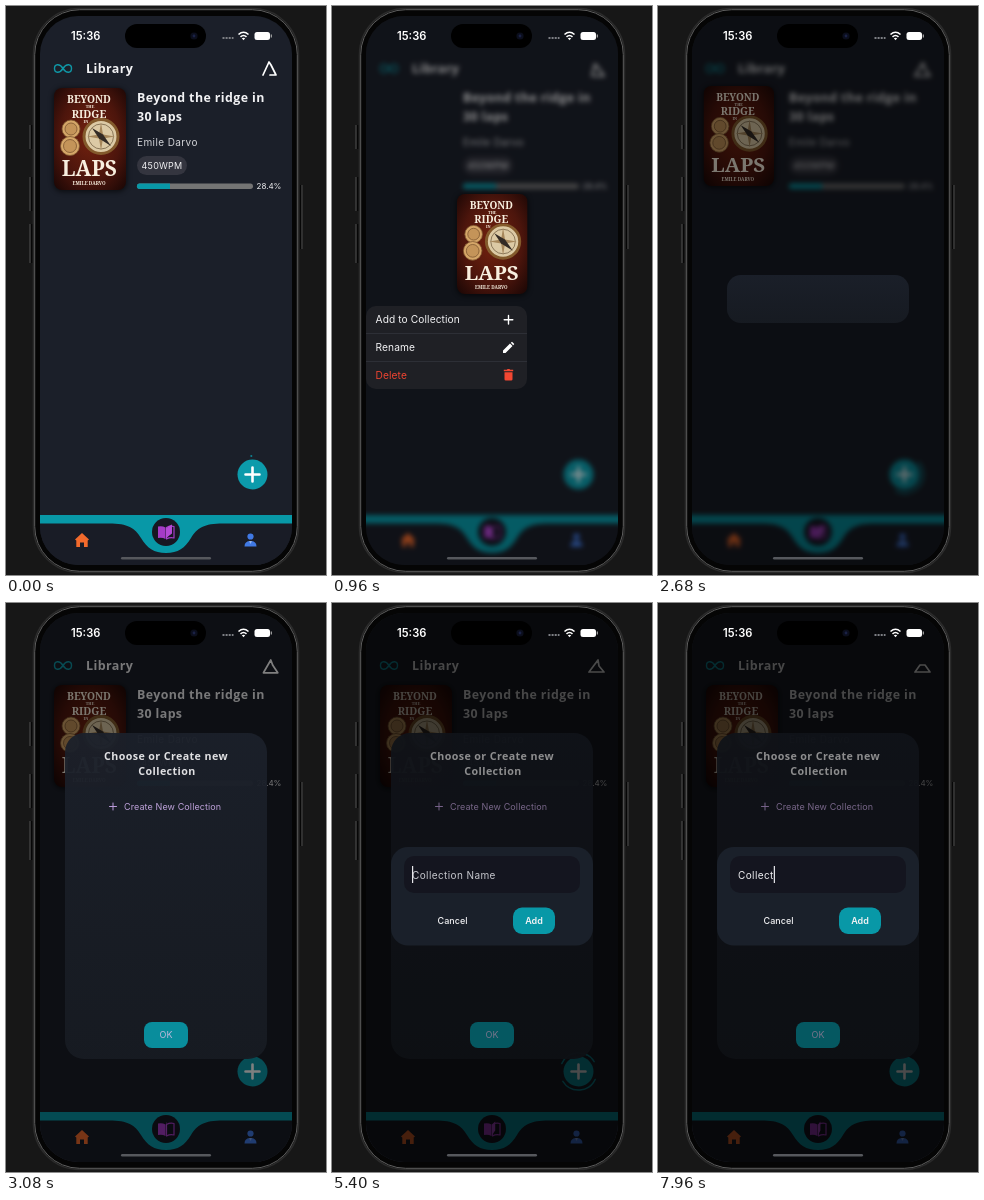
Recreate the animation shown at these times as an HTML page. Size 320x569 px, loop 8000 ms.

```html
<!DOCTYPE html>
<html lang="en">
<head>
<meta charset="utf-8">
<title>Library</title>
<style>
  html, body { margin: 0; width: 100%; height: 100%; overflow: hidden; background: #171717; }
  svg { display: block; width: 100vw; height: 100vh; }
  text { font-family: Inter, Roboto, sans-serif; fill: #f2f2f4; white-space: pre; }
  .head { font-family: "Open Sans", "Noto Sans", sans-serif; font-weight: 700; letter-spacing: .4px; }
  .cover text { font-family: "Noto Serif", serif; font-weight: 700; fill: #f8efdf; text-anchor: middle; }
  .mid { text-anchor: middle; }
  .line { fill: none; stroke: #fff; stroke-width: 1.4; stroke-linecap: round; stroke-linejoin: round; }
</style>
</head>
<body>
<svg viewBox="0 0 320 569">
  <defs>
    <clipPath id="screen"><rect x="34" y="10" width="252" height="549" rx="38"/></clipPath>
    <clipPath id="coverClip"><rect width="72" height="102" rx="8"/></clipPath>
    <filter id="soft" filterUnits="userSpaceOnUse" x="20" y="0" width="280" height="569" color-interpolation-filters="sRGB">
      <feGaussianBlur id="blur" stdDeviation="0"/>
    </filter>
    <filter id="shade" x="-20%" y="-20%" width="140%" height="140%"><feGaussianBlur stdDeviation="2.5"/></filter>
    <radialGradient id="leather" cx=".5" cy=".48" r=".7">
      <stop offset="0" stop-color="#74220f"/><stop offset=".6" stop-color="#4c150c"/><stop offset="1" stop-color="#1c0705"/>
    </radialGradient>
    <linearGradient id="panel" x2="0" y2="1">
      <stop offset="0" stop-color="#1b202a"/><stop offset="1" stop-color="#171b22"/>
    </linearGradient>
  </defs>

  <!-- phone body -->
  <rect width="320" height="569" fill="#171717"/>
  <path d="M25 119v24M25 171v34M25 218v39M295.500 179v64" stroke="#060606" stroke-width="3"/>
  <path d="M24 119v24M24 171v34M24 218v39M296 179v64" stroke="#666" stroke-width=".9"/>
  <rect x="27.500" y="2.500" width="265" height="564" rx="46" fill="#050505" stroke="#2b2b2b" stroke-width="1.600"/>
  <rect x="28.700" y="3.700" width="262.600" height="561.600" rx="45" fill="none" stroke="#5e5e5e" stroke-width="1"/>

  <g clip-path="url(#screen)">
    <g id="app">
      <rect x="20" width="280" height="569" fill="#1b1f29"/>
      <path d="M57 62.500C53.500 57 48.500 58 48.500 62.500S53.500 68 57 62.500 65.500 58 65.500 62.500 60.500 68 57 62.500Z" class="line" style="stroke:#0f96a5"/>
      <text class="head" x="80" y="67" font-size="12.500">Library</text>
      <path id="peak" class="line" style="stroke-width:1.700"/>
      <text class="head" x="131" y="96" font-size="12.400">Beyond the ridge in</text>
      <text class="head" x="131" y="115" font-size="12.400">30 laps</text>
      <text x="131" y="140" font-size="10" letter-spacing=".4" style="fill:#d3d4d8">Emile Darvo</text>
      <rect x="131" y="150" width="50" height="19" rx="9.500" fill="#34353f"/>
      <text class="mid" x="156" y="163" font-size="9" letter-spacing=".2">450WPM</text>
      <rect x="131" y="177.500" width="116" height="5.500" rx="2.700" fill="#747474"/>
      <path d="M133.700 177.500H164v5.500h-30.300a2.750 2.750 0 0 1 0-5.500Z" fill="#0898a7"/>
      <text x="250.500" y="183.300" font-size="8">28.4%</text>

      <circle cx="246.500" cy="468.500" r="15" fill="#0c9bab"/>
      <path d="M246.500 461.500v14M239.500 468.500h14" stroke="#fff" stroke-width="2.600" stroke-linecap="round"/>
      <circle id="ring" cx="246.500" cy="468.500" r="18.500" class="line" style="stroke:#0c9bab" transform="rotate(-95 246.500 468.500)" pathLength="100"/>

      <rect x="20" y="509" width="280" height="60" fill="#191c26"/>
      <path d="M20 509H300V517.500H217C198 517.500 191 522 185 532C179 542 172 547 160 547S141 542 135 532C129 522 122 517.500 103 517.500H20Z" fill="#0898a7"/>
      <circle cx="160" cy="526" r="14" fill="#171722"/>
      <path d="M152 520.500q4-1 7.500 1v11.500q-3.500-2-7.500-1Z" fill="#a53bc6"/>
      <path d="M168 520.500q-4-1-7.500 1v11.500q3.500-2 7.500-1Z" class="line" style="stroke:#a53bc6;stroke-width:1.200"/>
      <path id="page" d="M0 0Q3-3 6-4V5Q3 7 0 10Z" fill="#b44ad4"/>
      <path d="M69 533.500L76 527l7 6.500-1.300 1V541H78v-4.500h-4V541h-3.700v-6.500Z" fill="#f26a2c"/>
      <circle cx="244.500" cy="530.500" r="3.100" fill="#4079e4"/>
      <path d="M238.500 540.500q0-5.500 6-5.500t6 5.500Z" fill="#4079e4"/>
      <path id="collar" d="M243 535l1.500 3 1.500-3Z" fill="#fff"/>
    </g>
    <rect id="contextDim" width="320" height="569" fill="#000"/>

    <g id="cover" class="cover">
      <rect x="-1" y="0" width="74" height="104" rx="9" fill="#000" opacity=".55" filter="url(#shade)"/>
      <g clip-path="url(#coverClip)">
        <rect width="72" height="102" fill="url(#leather)"/>
        <text x="35" y="15" font-size="10.200">BEYOND</text>
        <text x="36" y="20" font-size="4">THE</text>
        <text x="35" y="29.500" font-size="10.500">RIDGE</text>
        <text x="32" y="35" font-size="4">IN</text>
        <g fill="#d5a668" stroke="#7d5630" stroke-width=".8">
          <circle cx="17" cy="41" r="9"/><circle cx="17" cy="41" r="6" fill="#c49459"/>
          <circle cx="16" cy="58" r="9.500"/><circle cx="16" cy="58" r="6.500" fill="#c49459"/>
        </g>
        <circle cx="47" cy="48.500" r="17" fill="#dccaa5" stroke="#835a2c" stroke-width="3"/>
        <circle cx="47" cy="48.500" r="12.500" fill="none" stroke="#665338" stroke-width=".7"/>
        <path d="M47 34.500l2 12 12 2-12 2-2 12-2-12-12-2 12-2Z" fill="#a6875b"/>
        <path d="M38 40l11 6.500L57 58l-12-7.500Z" fill="#332b25"/>
        <text x="35.500" y="88" font-size="21">LAPS</text>
        <text x="35" y="97" font-size="4.600">EMILE DARVO</text>
      </g>
    </g>

    <g id="menu">
      <rect x="34" y="300" width="161" height="83" rx="10" fill="#1f2025"/>
      <path d="M34 327.500h161M34 355.500h161" stroke="#32333a" stroke-width=".8"/>
      <g font-size="10.200" letter-spacing=".1">
        <text x="43.500" y="317">Add to Collection</text>
        <text x="43.500" y="345">Rename</text>
        <text x="43.500" y="372.500" style="fill:#ef4431">Delete</text>
      </g>
      <path d="M176.500 309.500v8.500M172.200 313.800h8.600" class="line"/>
      <path d="M171 347v-2.500l7-7 2.500 2.500-7 7ZM178.800 336.800l1.200-1 2.300 2.300-1.100 1.200Z" fill="#fff"/>
      <path d="M172.500 366.200h8v7q0 1.300-1.300 1.300h-5.400q-1.300 0-1.300-1.300ZM171.800 363.800h3l.8-.8h1.800l.8.8h3v1.400h-9.400Z" fill="#f34732"/>
    </g>

    <rect id="barrier" width="320" height="569" fill="#000"/>
    <g id="chooser">
      <rect id="chooserBox" fill="url(#panel)" fill-opacity=".95"/>
      <g id="chooserText">
        <g class="mid" font-size="10.700">
          <text class="head" x="160" y="157">Choose or Create new</text>
          <text class="head" x="161" y="172">Collection</text>
        </g>
        <path d="M107 200v7M103.500 203.500h7" class="line" style="stroke:#c9a6ea;stroke-width:1"/>
        <text x="118" y="207" font-size="9" letter-spacing=".1" style="fill:#cdaeea">Create New Collection</text>
        <rect x="138" y="419" width="44" height="26" rx="8" fill="#0898a7"/>
        <text class="mid" x="160" y="435.300" font-size="9" style="fill:#cdc6ee">OK</text>
      </g>
    </g>

    <rect id="barrier2" width="320" height="569" fill="#000"/>
    <g id="namer">
      <rect x="59" y="244" width="202" height="98.500" rx="17" fill="#1a202a"/>
      <rect x="72" y="253" width="176" height="37" rx="10" fill="#14151f"/>
      <text id="field" x="80" y="275.700" font-size="10" letter-spacing=".4"></text>
      <rect id="caret" y="263" width="1.200" height="17" fill="#e6e6ea"/>
      <text class="mid" x="120.500" y="321" font-size="9" font-weight="500">Cancel</text>
      <rect x="181" y="304.500" width="42" height="26.500" rx="9" fill="#0898a7"/>
      <text class="mid" x="202" y="321" font-size="9" font-weight="600">Add</text>
    </g>
  </g>

  <!-- system overlay -->
  <text x="65" y="34" font-size="11.200" font-weight="600" style="fill:#fff">15:36</text>
  <rect x="119" y="18" width="81" height="24" rx="12" fill="#000"/>
  <circle cx="188" cy="30" r="3.600" fill="#0b0e1c"/><circle cx="188" cy="30" r="1.400" fill="#1a2145"/>
  <path d="M216.500 32h11" stroke="#7d7f84" stroke-width="2" stroke-dasharray="2 1.100"/>
  <path d="M232.500 28.500q5-4.500 10 0M234.500 30.800q3-2.600 6 0" fill="none" stroke="#fff" stroke-width="1.600"/>
  <path d="M235.800 32.300q1.700-1.300 3.400 0l-1.700 1.900Z" fill="#fff"/>
  <rect x="248.500" y="26" width="15.500" height="8" rx="2.500" fill="#fff"/>
  <path d="M265.300 28.500v3" stroke="#aaa" stroke-width="1.200"/>
  <rect x="115" y="551" width="90" height="2.600" rx="1.300" fill="#56585d"/>
</svg>

<script>
const LOOP = 8000;
const $ = id => document.getElementById(id);
const set = (id, attrs) => { for (const name in attrs) $(id).setAttribute(name, attrs[name]); };
const fade = (id, value) => set(id, { opacity: value });
const smooth = x => x * x * (3 - 2 * x);

// Value at time t along [time, value] keys.
function along(t, keys, ease = smooth) {
  if (t <= keys[0][0]) return keys[0][1];
  for (let i = 1; i < keys.length; i++) {
    const [t0, a] = keys[i - 1], [t1, b] = keys[i];
    if (t > t1) continue;
    const p = ease((t - t0) / (t1 - t0));
    return Array.isArray(a) ? a.map((v, j) => v + (b[j] - v) * p) : a + (b - a) * p;
  }
  return keys[keys.length - 1][1];
}

// x, y of left foot, summit, shoulder and right foot, then the end of the base line
const peakPoses = [
  [0, [257, 69, 263, 56, 265, 59, 270, 69, 264]],
  [960, [260, 70, 263, 58, 267, 63, 272, 70, 262]],
  [1880, [257, 70, 261, 65, 267, 64, 272, 70, 257]],
  [2680, [257, 70, 265, 57, 267, 63, 272, 70, 257]],
  [4000, [259, 69, 264, 57, 266, 60, 271, 69, 259]],
  [5400, [257, 69, 266, 57, 267, 63, 272, 69, 257]],
  [7960, [257, 69, 262, 62, 267, 62, 272, 69, 257]]
];

function drawIcons(t) {
  const [lx, ly, sx, sy, hx, hy, rx, ry, baseEnd] = along(t, peakPoses);
  set('peak', { d: `M${lx} ${ly}L${sx} ${sy}L${hx} ${hy}L${rx} ${ry}H${baseEnd}` });

  const ring = t % 2500;
  const length = along(ring, [[0, .6], [200, 45], [400, 34]]);
  set('ring', {
    'stroke-dasharray': ring < 250 ? `${length} 100` : `${length} ${50 - length}`,
    'stroke-dashoffset': -ring / 12,
    opacity: along(ring, [[0, 1], [390, 1], [450, 0]])
  });

  const wave = Math.cos(t / 2500 * 2 * Math.PI);
  set('page', { transform: `translate(160 522.500) scale(${wave} 1)` });
  fade('collar', .15 + .15 * (1 + wave));
}

function drawContextMenu(t) {
  const blur = along(t, [[500, 0], [820, 2.6], [2700, 2.6], [2860, 0]]);
  set('blur', { stdDeviation: blur });
  if (blur) set('app', { filter: 'url(#soft)' });
  else $('app').removeAttribute('filter');
  fade('contextDim', along(t, [[500, 0], [820, .4], [2400, .4], [2700, .08], [2860, 0]]));

  const [x, y, scale] = along(t, [
    [100, [48, 82, 1]], [500, [45, 78, 1.08]], [820, [125, 188, .98]],
    [2400, [125, 188, .98]], [2650, [45.500, 80, .98]], [2740, [45.500, 80, .98]], [2860, [48, 82, 1]]
  ]);
  set('cover', { transform: `translate(${x} ${y}) scale(${scale})` });

  const grow = along(t, [[560, 0], [820, 1], [2380, 1], [2580, 0]]);
  set('menu', { opacity: grow, transform: `translate(34 300) scale(${.3 + .7 * grow}) translate(-34 -300)` });
}

function drawDialogs(t) {
  fade('barrier', along(t, [[2460, 0], [2680, .5]]));
  fade('chooser', along(t, [[2540, 0], [2660, 1]]));
  const [width, height, radius] = along(t, [[2680, [182, 48, 14]], [3040, [202, 326, 19]]]);
  set('chooserBox', { x: 160 - width / 2, y: 293 - height / 2, width, height, rx: radius });
  fade('chooserText', along(t, [[2900, 0], [3120, 1]]));

  const shown = along(t, [[5080, 0], [5280, 1]]);
  fade('barrier2', .42 * shown);
  fade('namer', shown);

  const typed = 'Collect'.slice(0, Math.max(0, Math.floor((t - 6100) / 260)));
  const field = $('field');
  const content = typed || 'Collection Name';
  if (field.textContent !== content) field.textContent = content;
  field.style.fill = typed ? '#f0f0f3' : '#c6c7cd';
  set('caret', { x: 80 + (typed ? field.getComputedTextLength() : 0) });
  fade('caret', typed || (t - 5150) % 1000 < 500 ? 1 : 0);
}

function frame() {
  const t = performance.now() % LOOP;
  drawIcons(t);
  drawContextMenu(t);
  drawDialogs(t);
  requestAnimationFrame(frame);
}
frame();
</script>
</body>
</html>
```
